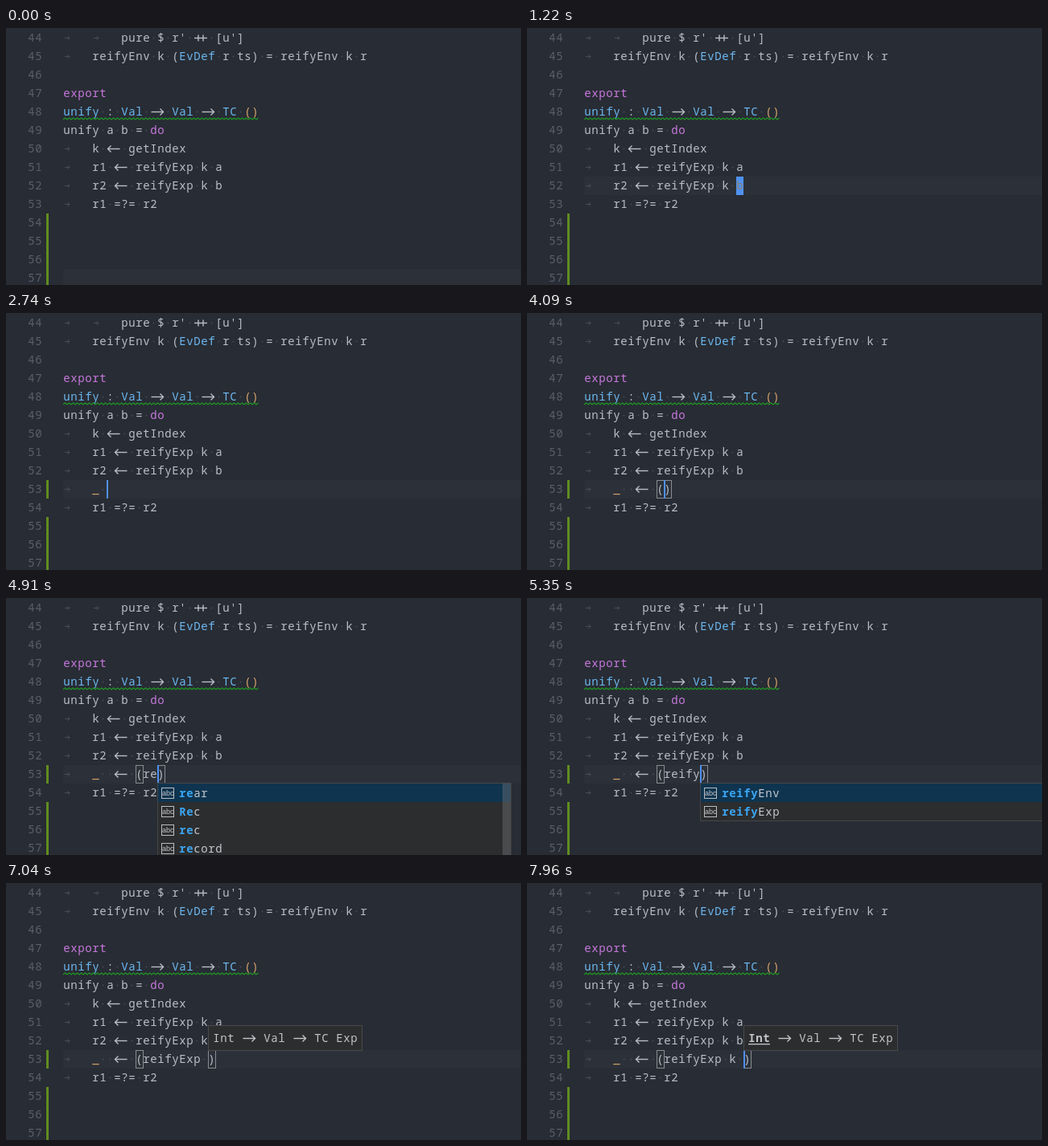
These frames come from a looping animation (640 by 320 pixels, 8000 ms). An HTML page with a canvas:

```html
<!DOCTYPE html>
<html lang="en">
<head>
<meta charset="utf-8">
<title>Editor session</title>
<style>
html, body { margin: 0; width: 100%; height: 100%; overflow: hidden; background: #282c34; }
canvas { display: block; width: 640px; height: 320px; }
</style>
</head>
<body>
<canvas id="stage"></canvas>
<script>
const W = 640, H = 320, LOOP = 8000;
const LEFT = 71, COL = 9, ROW = 23;
const C = {
  bg: '#282c34', line: '#2c3139', num: '#59606b', faint: '#484e5a',
  text: '#b9bec8', blue: '#6cb8f0', purple: '#c678dd', orange: '#d5a26c',
  bar: '#5f8d20', cursor: '#4f91f2', wave: '#1f9a24', box: '#888c91',
  panel: '#2c2d2e', border: '#454648', pick: '#0f344f', match: '#3ba5f2',
  thumb: 'rgba(121, 121, 121, .4)'
};
const FONT = '14px "Noto Sans Mono", "DejaVu Sans Mono", monospace';

const canvas = document.getElementById('stage');
const g = canvas.getContext('2d');
const dpr = window.devicePixelRatio || 1;
canvas.width = W * dpr;
canvas.height = H * dpr;

// Centre each glyph in its column.
g.font = FONT;
const inset = (COL - g.measureText('0').width) / 2;

const colX = c => LEFT + c * COL;
const rowY = n => 208 + (n - 53) * ROW;

function rect(x, y, w, h, color) {
  g.fillStyle = color;
  g.fillRect(x, y, w, h);
}

function frame(x, y, w, h, color) {
  g.strokeStyle = color;
  g.lineWidth = 1;
  g.strokeRect(x + .5, y + .5, w - 1, h - 1);
}

function path(points, color, width = 1.4) {
  g.strokeStyle = color;
  g.lineWidth = width;
  g.beginPath();
  points.forEach(([x, y], i) => i ? g.lineTo(x, y) : g.moveTo(x, y));
  g.stroke();
}

function arrow(x, y, len, head, dir, color, width) {
  const tip = dir > 0 ? x + len : x;
  path([[x, y], [x + len, y]], color, width);
  path([[tip - dir * head, y - head], [tip, y], [tip - dir * head, y + head]], color, width);
}

function plusPlus(x, y, color) {
  path([[x + 1, y], [x + 17, y]], color);
  for (const d of [6, 12]) path([[x + d, y - 4], [x + d, y + 4]], color);
}

// Draws on the column grid with two-column ligatures; returns the next x.
function write(str, x, y, color, { dots = false, bold = false } = {}) {
  g.font = (bold ? 'bold ' : '') + FONT;
  const mid = y + 11.5;
  for (let i = 0; i < str.length; i++) {
    const pair = str.substr(i, 2);
    if (pair === '->' || pair === '<-' || pair === '++') {
      if (pair === '++') plusPlus(x, mid, color);
      else arrow(x + 1.5, mid, 15, 4, pair === '->' ? 1 : -1, color);
      x += 2 * COL;
      i++;
    } else if (str[i] === '\t') {
      arrow(x + 2, mid, 6, 2.5, 1, C.faint, 1);
      x += 4 * COL;
    } else {
      if (str[i] !== ' ') {
        g.fillStyle = color;
        g.fillText(str[i], x + inset, y + 16);
      } else if (dots) {
        rect(x + 3.7, mid - .8, 1.6, 1.6, C.faint);
      }
      x += COL;
    }
  }
  return x;
}

// Each line is a list of text, colour name, text, colour name...
const HEAD = [
  ["\t\tpure $ r' ++ [u']", 'text'],
  ['\treifyEnv k (', 'text', 'EvDef', 'blue', ' r ts) = reifyEnv k r', 'text'],
  [],
  ['export', 'purple'],
  ['unify', 'blue', ' : ', 'text', 'Val', 'blue', ' -> ', 'text', 'Val', 'blue',
    ' -> ', 'text', 'TC', 'blue', ' ', 'text', '()', 'orange'],
  ['unify a b = ', 'text', 'do', 'purple'],
  ['\tk <- getIndex', 'text'],
  ['\tr1 <- reifyExp k a', 'text'],
  ['\tr2 <- reifyExp k b', 'text']
];
const TAIL = ['\tr1 =?= r2', 'text'];

// Normal-mode cursor: time, line, column
const MOVES = [[-700, 57, 0], [300, 56, 0], [400, 55, 0], [500, 54, 0],
  [600, 53, 0], [700, 52, 0], [950, 52, 21]];
const OPEN = 1500, MARK = 1720;

// Inserted text: time, added characters
const KEYS = [[OPEN, ''], [2150, '_'], [2400, ' '], [2900, ' '], [3400, '<'], [3550, '-'],
  [3750, ' '], [4060, '('], [4400, 'r'], [4700, 'e'], [4960, 'i'], [5080, 'f'],
  [5210, 'y'], [6150, 'Exp'], [6450, ' '], [7560, 'k'], [7720, ' ']];

const WORDS = ['rear', 'Rec', 'rec', 'record'];
const NAMES = ['reifyEnv', 'reifyExp'];
// Completion list: time, items, matched length, column, selected row
const LISTS = [[4520, WORDS, 1, 12, 0], [4730, WORDS, 2, 13, 0], [4970, WORDS, 2, 14, 0],
  [5090, NAMES, 4, 15, 0], [5220, NAMES, 5, 16, 0], [5890, NAMES, 5, 16, 1], [6150, null]];
// Signature hint: time, column, active parameter shown
const HINTS = [[6820, 20, false], [7820, 22, true]];

const latest = (list, t) => list.filter(e => e[0] <= t).pop();
const blinkOn = age => Math.floor(age / 500) % 2 === 0;

function codeLine(n, parts) {
  let x = LEFT;
  for (let i = 0; i < parts.length; i += 2)
    x = write(parts[i], x, rowY(n), C[parts[i + 1]], { dots: true });
}

function wave(x0, x1, y) {
  const points = [];
  for (let x = x0, i = 0; x <= x1; x += 2.5, i++) points.push([x, y + (i % 2 ? -1 : 1)]);
  path(points, C.wave, 1.1);
}

function gutter(from, to) {
  rect(50, rowY(from), 3, (to - from + 1) * ROW, C.bar);
}

function normalCursor(t) {
  const [since, line, col] = latest(MOVES, t);
  if (!blinkOn(t - since)) return;
  rect(colX(col), rowY(line), COL, ROW, C.cursor);
  if (col === 21) write('b', colX(col), rowY(line), '#8b806f');
}

function insertLine(t) {
  const typed = KEYS.filter(k => k[0] <= t);
  const str = typed.map(k => k[1]).join('');
  const y = rowY(53), end = colX(4 + str.length);
  write('\t', LEFT, y, C.text);
  write(str.slice(0, 1), colX(4), y, C.orange);
  write(str.slice(1), colX(5), y, C.text, { dots: true });
  const open = str.indexOf('(');
  if (open >= 0) {
    write(')', end, y, C.text);
    frame(colX(4 + open), y, COL + 1, ROW, C.box);
    frame(end, y, COL + 1, ROW, C.box);
  }
  if (blinkOn(t - typed[typed.length - 1][0])) rect(end, y, 2, ROW, C.cursor);
}

function icon(x, y) {
  frame(x, y, 16, 14, '#b9bcc0');
  g.font = '9px "Liberation Sans", sans-serif';
  g.fillStyle = '#c4c6c9';
  g.fillText('abc', x + 1, y + 10);
}

function completion(t) {
  const state = latest(LISTS, t);
  if (!state || !state[1]) return;
  const [, items, hit, col, picked] = state;
  const x = colX(col), y = 231, w = 440, long = items === WORDS;
  const h = (long ? 12 : items.length) * ROW;
  rect(x, y, w, h, C.panel);
  rect(x, y + picked * ROW, w, ROW, C.pick);
  items.forEach((word, i) => {
    const top = y + i * ROW;
    icon(x + 5, top + 5);
    const next = write(word.slice(0, hit), x + 27, top + 1, C.match, { bold: true });
    write(word.slice(hit), next, top + 1, '#c3c7cd');
  });
  if (long) rect(x + w - 11, y, 11, h, C.thumb);
  frame(x, y - 1, w, h + 2, C.border);
}

function hint(t) {
  const state = latest(HINTS, t);
  if (!state) return;
  const [, col, active] = state;
  const x = colX(col), y = 177, color = '#c2c5c9';
  rect(x, y, 192, 32, C.panel);
  frame(x, y, 192, 32, '#4a4a4b');
  const next = write('Int', x + 6, 182, color, { bold: active });
  if (active) rect(x + 6, 200, 3 * COL, 1.3, color);
  write(' -> Val -> TC Exp', next, 182, color);
}

function draw(t) {
  const opened = t >= OPEN;
  const current = opened ? 53 : latest(MOVES, t)[1];
  g.setTransform(dpr, 0, 0, dpr, 0, 0);
  rect(0, 0, W, H, C.bg);
  rect(LEFT, rowY(current), W - LEFT, ROW, C.line);
  for (let n = 44; n <= 57; n++) write(String(n), 27, rowY(n), C.num);
  gutter(opened ? 55 : 54, 57);
  if (t >= MARK) gutter(53, 53);
  HEAD.forEach((parts, i) => codeLine(44 + i, parts));
  wave(LEFT, 314, 113);
  codeLine(opened ? 54 : 53, TAIL);
  if (opened) insertLine(t);
  else normalCursor(t);
  completion(t);
  hint(t);
}

const start = performance.now();
function tick() {
  draw((performance.now() - start) % LOOP);
  requestAnimationFrame(tick);
}
tick();
</script>
</body>
</html>
```
